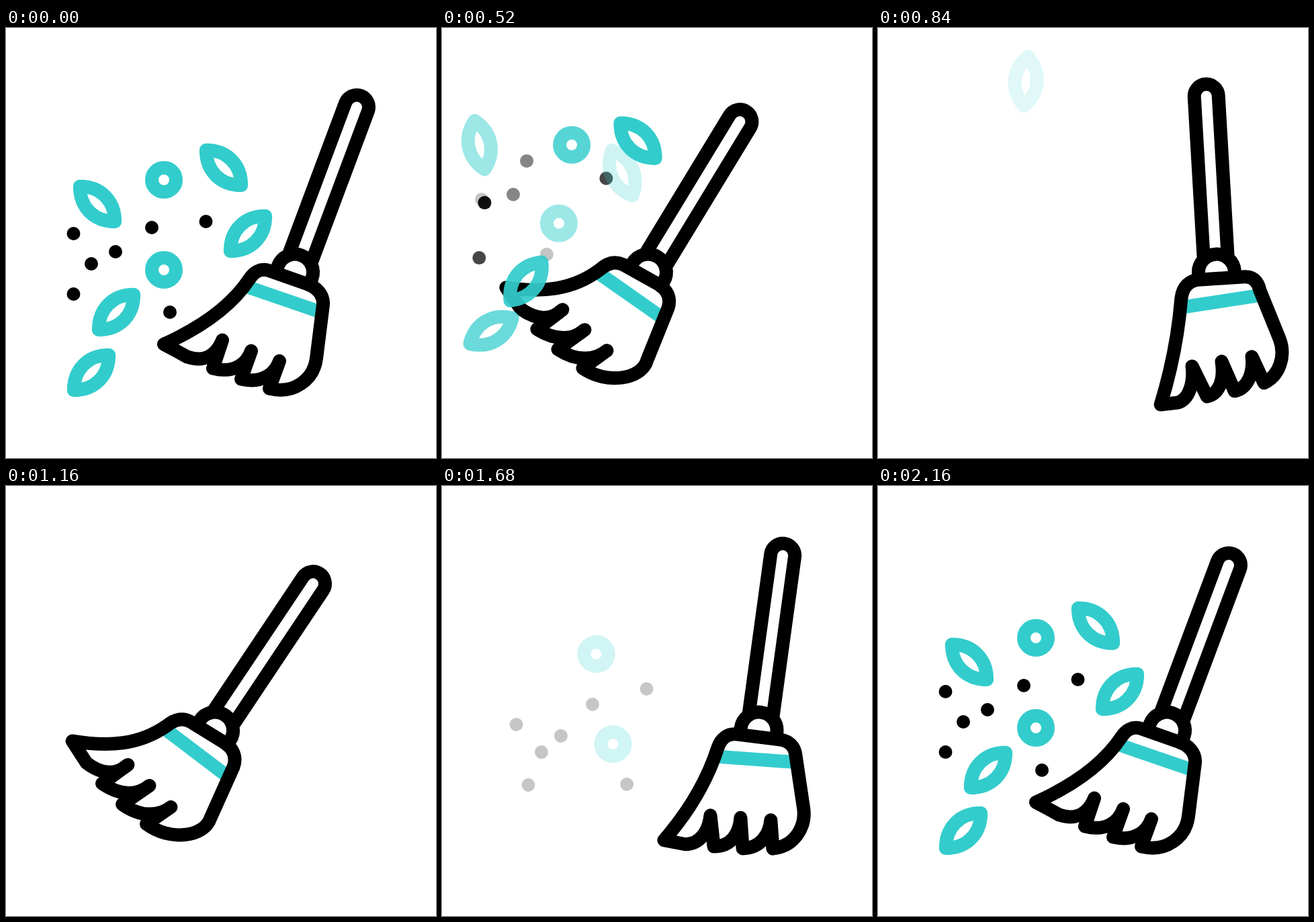
An HTML page that plays this animation: 640x640 px, repeating every 2.2 s.

```html
<!DOCTYPE html>
<html lang="en">
<head>
<meta charset="utf-8">
<title>Sweeping broom</title>
<style>
  html, body { margin: 0; width: 100%; height: 100%; overflow: hidden; background: #fff; }
  svg { display: block; width: 100%; height: 100%; }
  .line { fill: none; stroke: #000; stroke-width: 20; stroke-linejoin: round; stroke-linecap: round; }
  .teal { fill: none; stroke: #3cc; stroke-width: 20; stroke-linejoin: round; }
</style>
</head>
<body>
<svg id="stage" viewBox="0 0 640 640" xmlns="http://www.w3.org/2000/svg">
  <g id="broom">
    <path class="line" d="M-18 -25V-262.5A18 18 0 0 1 18 -262.5V-25"/>
    <path class="line" d="M-27 8V0A27 27 0 0 1 27 0V8" stroke-linecap="butt"/>
    <path id="band" class="teal"/>
    <path id="head" class="line"/>
  </g>
  <g id="debris"></g>
</svg>
<script>
const LOOP = 2200, STEP = 40;
const $ = id => document.getElementById(id);
const clamp = v => Math.min(1, Math.max(0, v));
const smooth = v => v * v * (3 - 2 * v);
const mix = (a, b, k) => a + (b - a) * k;

// Stage coordinates of the bristles, turned into the broom's own frame.
function shape(x, y, angle, head, band) {
  const c = Math.cos(angle * Math.PI / 180), s = Math.sin(angle * Math.PI / 180);
  const local = text => {
    const n = text.match(/[\d.]+/g).map(Number), out = [];
    for (let i = 0; i < n.length; i += 2) {
      const dx = n[i] - x, dy = n[i + 1] - y;
      out.push(dx * c + dy * s, dy * c - dx * s);
    }
    return out;
  };
  return { head: local(head), band: local(band) };
}

const HEAD = 'MCCLCLCLCLCLCZ', BAND = 'ML';
const straight = shape(430, 364, 20.5,
  `235,471 300,442 340,408 363,373 369,364 378,358 390,361 447,381
   463,386 473,398 472,412 462,492 458,524 428,546 392,537
   407,496 400,515 382,530 350,523 365,481 358,500 340,515 308,507
   322,465 314,485 297,499 270,490`,
  '360,386 468,423');
const left = shape(307.5, 363.5, 31.3,
  `96,386 150,394 195,390 235,360 245,351 257,346 270,352 322,381
   336,389 342,402 337,417 306,494 298,523 246,531 210,506
   246,480 230,493 203,498 173,478 213,449 197,463 172,467 142,448
   180,419 165,433 145,437 118,418`,
  '234,365 331,433');
const right = shape(503.7, 363.2, -3.2,
  `420,560 437,505 447,450 451,402 453,385 463,374 480,374 545,370
   557,369 565,376 568,390 597,462 607,488 597,517 574,528
   556,489 559,512 550,536 530,540 511,496 515,522 508,544 489,548
   467,503 470,528 462,552 446,557`,
  '453,415 568,397.5');

function bentPath(part, commands, bend) {
  const from = straight[part], to = (bend > 0 ? left : right)[part];
  const n = from.map((v, i) => mix(v, to[i], Math.abs(bend)).toFixed(2));
  let i = 0;
  return [...commands].map(c => {
    const count = { M: 2, L: 2, C: 6, Z: 0 }[c];
    return c + n.slice(i, i += count).join(' ');
  }).join('');
}

// time, x, angle, bend
const sweep = [
  [200, 430, 20.5, 0], [560, 302.5, 31.7, 1.03], [880, 513, -4.9, -1.09],
  [1200, 302, 35.5, 1.035], [1520, 513, -4.9, -1.09], [1840, 430, 20.5, 0]
];

function drawBroom(t) {
  let i = 0;
  while (i < sweep.length - 2 && t >= sweep[i + 1][0]) i++;
  const a = sweep[i], b = sweep[i + 1];
  const k = smooth(clamp((t - a[0]) / (b[0] - a[0])));
  const [, x, angle, bend] = a.map((v, j) => mix(v, b[j], k));
  $('broom').setAttribute('transform', `translate(${x} 363.6) rotate(${angle})`);
  $('head').setAttribute('d', bentPath('head', HEAD, bend));
  $('band').setAttribute('d', bentPath('band', BAND, bend));
}

const LEAVE = 220, FADE = 325, ENTER = 360;

// x, y, gone at, exit dx, dy, entry dx, dy, base angle, exit turn
const leaves = [
  [136, 262, 675, -156, -171, 5, 59, -45, 64],
  [324, 208, 888, -117, -145, -12, 14, -45, 58],
  [360, 306, 595, -131, -129, 10, 3, 45, -90],
  [164, 423, 822, -119, -140, 45, 49, 45, -80],
  [127, 513, 755, -136, -157, 67, 55, 45, 50]
];
const rings = [
  [235, 226, 787, -116, -144, -7, 31],
  [235, 360, 675, -119, -135, 25, 31]
];
const dots = [
  [100.5, 306, 822, -113, -140, 13, 63],
  [217, 297, 675, -177, -193, 9, 36],
  [297.5, 288, 755, -134, -162, 9, 18],
  [163, 333, 675, -111, -166, 18, 50],
  [127, 351, 595, -97, -137, 27, 58],
  [100.5, 396, 755, -114, -136, 36, 63],
  [244, 423, 595, -126, -123, 40, 27]
];

function makeBits(list, tag, attributes, enterAt) {
  return list.map(([x, y, gone, outX, outY, inX, inY, base = 0, turn = 0]) => {
    const node = document.createElementNS('http://www.w3.org/2000/svg', tag);
    for (const name in attributes) node.setAttribute(name, attributes[name]);
    $('debris').append(node);
    return { node, x, y, gone, outX, outY, inX, inY, base, turn, enterAt };
  });
}

const bits = [
  ...makeBits(dots, 'circle', { r: 10 }, 1600),
  ...makeBits(rings, 'circle', { r: 18, class: 'teal' }, 1600),
  ...makeBits(leaves, 'path', { d: 'M0 -37C22 -15 22 15 0 37C-22 15 -22 -15 0 -37Z', class: 'teal' }, 1800)
];

function drawBit(bit, t) {
  let dx, dy, angle, opacity;
  if (t < 1400) {
    const k = clamp((t - LEAVE) / (bit.gone - LEAVE)) ** 1.6;
    const faded = clamp((t - bit.gone + FADE) / FADE);
    dx = bit.outX * k;
    dy = bit.outY * k;
    angle = bit.base + bit.turn * faded;
    opacity = 1 - faded;
  } else {
    opacity = clamp((t - bit.enterAt) / ENTER);
    const rest = 1 - opacity;
    dx = bit.inX * rest;
    dy = bit.inY * rest;
    angle = bit.base - 12 * rest;
  }
  bit.node.setAttribute('transform', `translate(${bit.x + dx} ${bit.y + dy}) rotate(${angle})`);
  bit.node.setAttribute('opacity', opacity);
}

function draw(t) {
  drawBroom(t);
  bits.forEach(bit => drawBit(bit, t));
}

const start = performance.now();
function tick() {
  const t = (performance.now() - start) % LOOP;
  draw(Math.floor(t / STEP) * STEP);
  requestAnimationFrame(tick);
}
tick();
</script>
</body>
</html>
```
